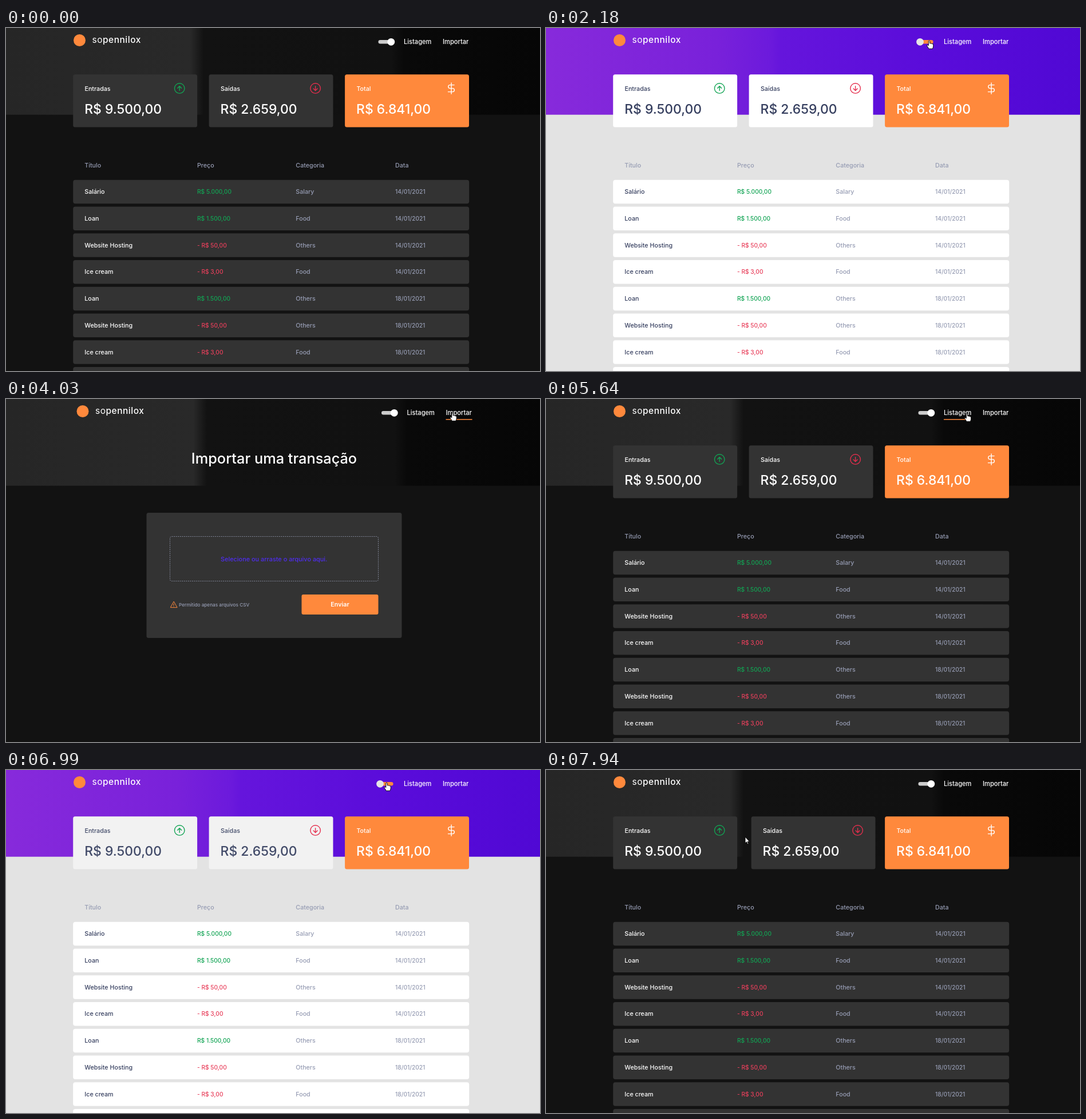
These frames come from a looping animation (933x600 px, 8000 ms). An HTML page:

```html
<!DOCTYPE html>
<html lang="pt-BR">
<head>
<meta charset="utf-8">
<title>Finanças</title>
<style>
html, body { margin: 0; width: 100%; height: 100%; overflow: hidden; background: #121212; }
svg { display: block; width: 100%; height: 100%; font: 500 10.7px Inter, "Open Sans", sans-serif; }
svg { --bg: #121212; --row: #333; --title: #fff; --header: url(#dark); }
svg.light { --bg: #e3e3e3; --row: #fff; --title: #363f5f; --header: url(#light); }
.bg { fill: var(--bg); }
.header { fill: var(--header); }
.row { fill: var(--row); }
.title { fill: var(--title); }
.muted { fill: #969cb3; }
.cell { font-weight: 450; }
.small { font-size: 10.2px; }
.in { fill: #12a454; }
.out { fill: #e83f5b; }
.white { fill: #fff; }
.orange { fill: #ff893c; }
.amount { font-size: 22.9px; }
.card { fill: var(--card); }
.ink { fill: var(--ink); }
.line { fill: none; stroke-width: 1.4; stroke-linecap: round; stroke-linejoin: round; }
.mid { text-anchor: middle; }
</style>
</head>
<body>
<svg viewBox="0 0 933 600">
  <defs>
    <linearGradient id="dark" gradientUnits="userSpaceOnUse" x1="0" x2="933">
      <stop offset="0" stop-color="#262626"/>
      <stop offset=".345" stop-color="#292929"/>
      <stop offset=".37" stop-color="#121212"/>
      <stop offset=".722" stop-color="#111"/>
      <stop offset=".745" stop-color="#090909"/>
      <stop offset="1" stop-color="#060606"/>
    </linearGradient>
    <linearGradient id="light" gradientUnits="userSpaceOnUse" x1="0" x2="933">
      <stop offset="0" stop-color="#872adb"/>
      <stop offset=".32" stop-color="#7921da"/>
      <stop offset=".42" stop-color="#6c1adc"/>
      <stop offset=".44" stop-color="#6515dc"/>
      <stop offset=".72" stop-color="#5a0cda"/>
      <stop offset="1" stop-color="#5008d4"/>
    </linearGradient>
  </defs>
  <rect class="bg" width="933" height="600"/>
  <g id="top">
    <rect class="header" x="-20" width="973" height="151.7"/>
    <circle class="orange" cx="128.5" cy="21.5" r="10.5"/>
    <text class="white" x="150.5" y="26" font-size="15.5" letter-spacing=".5"><tspan font-weight="400">so</tspan>pennilox</text>
    <rect id="track" x="650.5" y="21" width="26" height="6.6" rx="3.3"/>
    <circle id="knob" cy="24.3" r="6.4"/>
    <text class="white" x="695" y="28" font-size="11.1">Listagem</text>
    <text class="white" x="763" y="28" font-size="11.1">Importar</text>
    <rect id="lineList" class="orange" x="695" y="35" width="48" height="1.5"/>
    <rect id="lineImport" class="orange" x="763" y="35" width="46" height="1.5"/>
  </g>
  <g id="list"></g>
  <g id="import">
    <text class="white mid" x="468.5" y="112.5" font-size="25.3">Importar uma transação</text>
    <rect x="245.5" y="199" width="446" height="219" rx="3.5" fill="#333"/>
    <rect x="286.5" y="240.5" width="364" height="78" rx="3" fill="none" stroke="#969cb3" stroke-width=".8" stroke-dasharray="2 1.6"/>
    <text class="mid" x="468.2" y="283.5" font-size="10.9" fill="#4f2df0">Selecione ou arraste o arquivo aqui.</text>
    <path class="line" stroke="#ff893c" style="stroke-width:1" d="M293 354.5 287.3 364.7H298.7ZM293 358.3V361.2M293 363V363.1"/>
    <text class="muted" x="302" y="362.6" font-size="8.2">Permitido apenas arquivos CSV</text>
    <rect class="orange" x="516.5" y="342" width="134" height="35" rx="3"/>
    <text class="white mid" x="583.5" y="363.3" font-weight="600">Enviar</text>
  </g>
  <g id="cursor" stroke="#000" stroke-width=".9" stroke-linejoin="round" fill="#fff">
    <path id="arrow" d="M.5 0V11L3 8.7 4.7 12.7 6.3 12 4.7 8.2H8Z"/>
    <path id="hand" d="M-1.2 .8Q0-.7 1.2 .8V5Q2.5 4.2 3.4 5.3 4.6 4.6 5.3 5.8 7 5.3 7.2 7V10Q7 12 5.9 14.3H-.8Q-2 11.5-3.9 9.3-4.3 7.4-2.6 7.6L-1.2 8.8Z"/>
  </g>
</svg>
<script>
const $ = id => document.getElementById(id);
const svg = document.querySelector("svg");
const text = (cls, x, y, s) => `<text class="${cls}" x="${x}" y="${y}">${s}</text>`;
const COLS = [137.3, 334, 506.3, 680];
const LOOP = 8000;

const card = (id, x, fill, ink, label, amount, icon) => `<g id="${id}">
  <rect class="${fill}" x="${x}" y="81.2" width="216.9" height="92.3" rx="3.5"/>
  ${text(ink, x + 20.3, 109.6, label)}${text(ink + " amount", x + 20, 150.2, amount)}
  <g class="line" transform="translate(${x + 186},105.6)">${icon}</g></g>`;
const arrowIcon = (color, turn) =>
  `<path stroke="${color}" transform="rotate(${turn})" d="M-8.8 0a8.8 8.8 0 1 0 17.6 0a8.8 8.8 0 1 0-17.6 0M0 3.8V-3.8M-3.5-.3 0-3.8 3.5-.3"/>`;
const dollar = `<path stroke="#fff" d="M0-9.6V9.6M5-6H-2.3a3 3 0 0 0 0 6H2.3a3 3 0 0 1 0 6H-5.6"/>`;

const items = [
  ["Salário", "R$ 5.000,00", "Salary", 14], ["Loan", "R$ 1.500,00", "Food", 14],
  ["Website Hosting", "- R$ 50,00", "Others", 14], ["Ice cream", "- R$ 3,00", "Food", 14],
  ["Loan", "R$ 1.500,00", "Others", 18], ["Website Hosting", "- R$ 50,00", "Others", 18],
  ["Ice cream", "- R$ 3,00", "Food", 18], ["Loan", "R$ 1.500,00", "Food", 18]
];
const row = ([name, price, kind, day], i) => {
  const y = 265.8 + 46.75 * i, base = y + 24.4;
  return `<rect class="row" x="117.2" y="${y}" width="692" height="41.5" rx="4"/>` +
    text("title", COLS[0], base, name) +
    text("small " + (price[0] == "-" ? "out" : "in"), COLS[1], base, price) +
    text("muted cell", COLS[2], base, kind) +
    text("muted cell small", COLS[3], base, day + "/01/2021");
};
$("list").innerHTML =
  card("income", 117.2, "card", "ink", "Entradas", "R$ 9.500,00", arrowIcon("#12a454", 0)) +
  card("outcome", 354.6, "card", "ink", "Saídas", "R$ 2.659,00", arrowIcon("#e52e4d", 180)) +
  card("total", 592.1, "orange", "white", "Total", "R$ 6.841,00", dollar) +
  ["Título", "Preço", "Categoria", "Data"].map((s, i) => text("muted cell", COLS[i], 243.6, s)).join("") +
  items.map(row).join("");

// pointer path: time, x, y
const path = [
  [70, 760, 357], [380, 701, 56], [550, 700, 54], [620, 700, 47], [850, 700, 47],
  [1250, 670, 24], [1400, 670, 23], [1560, 669.5, 22], [2320, 669.5, 22], [2490, 664.5, 21],
  [3190, 664.5, 21], [3500, 777, 26], [3730, 780, 24], [4340, 780, 24], [5110, 737, 24],
  [5640, 735.5, 25], [5820, 735, 25], [6100, 705, 28], [6440, 665, 21], [6610, 665, 22],
  [7460, 665, 22], [7940, 347.5, 117], [LOOP, 347.5, 117]
];
// theme switches: time, light or dark
const themes = [[-999, 0], [1940, 1], [3040, 0], [6830, 1], [7390, 0]];

const clamp = u => Math.max(0, Math.min(1, u));
const easeOut = u => 1 - (1 - clamp(u)) ** 2;
const mix = (a, b, u) => `rgb(${a.map((v, i) => Math.round(v + (b[i] - v) * u))})`;
const show = (id, on) => $(id).style.display = on ? "" : "none";
const move = (id, x, y = 0) => $(id).setAttribute("transform", `translate(${x},${y})`);

function pointer(t) {
  const i = Math.max(1, path.findIndex(p => p[0] > t));
  const [a, b] = [path[i - 1], path[i]];
  const u = clamp((t - a[0]) / (b[0] - a[0]));
  return [a[1] + (b[1] - a[1]) * u, a[2] + (b[2] - a[2]) * u];
}

function draw(t) {
  const [since, light] = themes.findLast(s => s[0] <= t);
  const fade = d => light ? easeOut((t - since) / d) : 1 - easeOut((t - since) / d);
  const f = fade(214), k = fade(170);
  svg.classList.toggle("light", !!light);
  svg.style.setProperty("--card", mix([51, 51, 51], [255, 255, 255], f));
  svg.style.setProperty("--ink", mix([255, 255, 255], [54, 63, 95], f));
  $("track").setAttribute("fill", mix([204, 204, 204], [255, 137, 60], k));
  $("knob").setAttribute("fill", mix([255, 255, 255], [229, 229, 229], k));
  $("knob").setAttribute("cx", 672.8 - 19.3 * k);

  const importing = t >= 3950 && t < 5560;
  const shift = importing ? 5.5 : 0;
  show("list", !importing);
  show("import", importing);
  move("top", shift);
  move("total", 2 * Math.sin(Math.PI * clamp((t - 150) / 400)));
  move("outcome", 4 * easeOut((t - 7770) / 150));

  const [x, y] = pointer(t);
  const over = (a, b) => t >= 70 && y > 14 && y < 38 && x >= a + shift && x <= b + shift;
  const onList = over(695, 743), onImport = over(763, 809);
  const onLink = onList || onImport || over(648, 680);
  show("lineList", onList);
  show("lineImport", onImport);
  show("cursor", t >= 70);
  show("hand", onLink);
  show("arrow", !onLink);
  move("cursor", x, y);
}

function tick() {
  draw(performance.now() % LOOP);
  requestAnimationFrame(tick);
}
tick();
</script>
</body>
</html>
```
